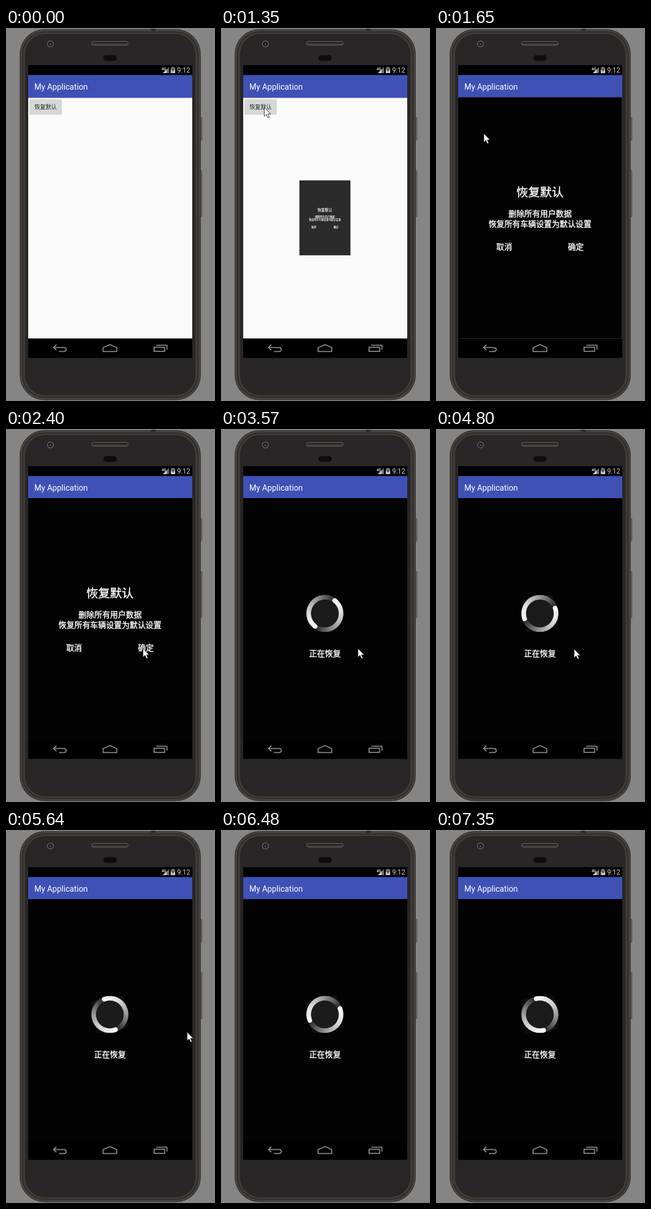
Animation, 367 px wide and 653 px high, one loop 7380 ms. Source, as an HTML page:

```html
<!DOCTYPE html>
<html lang="zh-CN">
<head>
<meta charset="utf-8">
<title>恢复默认</title>
<style>
html, body { margin: 0; width: 100%; height: 100%; overflow: hidden; background: #858585; }
svg { display: block; width: 100vw; height: 100vh; }
text { font-family: "Noto Sans CJK SC", "Noto Sans CJK", sans-serif; }
.latin { font-family: Roboto, sans-serif; }
.dialog text { fill: #fff; stroke: #fff; stroke-width: .4px; text-anchor: middle; font-size: 13.9px; }
.dialog .head { font-size: 20.8px; }
</style>
</head>
<body>
<svg viewBox="0 0 367 653" xmlns="http://www.w3.org/2000/svg">
  <defs>
    <clipPath id="page"><rect x="39" y="121" width="288" height="423"/></clipPath>
    <clipPath id="tile"><rect x="150" y="290.5" width="65" height="65"/></clipPath>
    <linearGradient id="speaker" x2="0" y2="1">
      <stop offset="0" stop-color="#1b1a1a"/><stop offset="1" stop-color="#454342"/>
    </linearGradient>
  </defs>

  <rect width="367" height="653" fill="#858585"/>

  <!-- phone -->
  <g fill="#66625f" stroke="#3a3633" stroke-width=".6">
    <rect x="340.5" y="156.5" width="3.6" height="40" rx="1"/>
    <rect x="340.5" y="249.5" width="3.6" height="81" rx="1"/>
  </g>
  <g fill="none">
    <rect x="24.5" y="2.5" width="317" height="648.5" rx="43" fill="#3b3734" stroke="#383431"/>
    <rect x="26.5" y="4.5" width="313" height="644.5" rx="41" stroke="#57514c"/>
    <rect x="29" y="7" width="308" height="639.5" rx="39" stroke="#302d2a" stroke-width="1.5"/>
    <rect x="31.5" y="9.5" width="303" height="634.5" rx="36.5" stroke="#46413d"/>
    <rect x="34.5" y="11.5" width="297" height="630.5" rx="34" fill="#282627" stroke="#222020"/>
  </g>
  <rect x="254" y="1.5" width="9" height="3" rx="1.5" fill="#24211f"/>
  <circle cx="78" cy="28" r="5.2" fill="#1b1a1a" stroke="#5c5a59" stroke-width="1.8"/>
  <circle cx="78" cy="28.5" r="2" fill="#484746"/>
  <rect x="150.5" y="23.5" width="64" height="6.5" rx="3.2" fill="url(#speaker)" stroke="#6b6967"/>
  <rect x="171" y="47.5" width="23.5" height="10" rx="5" fill="#0e0d0d"/>

  <!-- screen -->
  <rect x="39" y="65" width="288" height="512.5" fill="#000"/>
  <rect x="39" y="82.3" width="288" height="39.7" fill="#3f51b5"/>
  <rect x="39" y="122" width="288" height="421.5" fill="#fafafa"/>
  <rect x="39" y="122" width="288" height="1" fill="#c3c7dc"/>
  <rect x="39" y="123" width="288" height="1" fill="#ececf0"/>
  <text class="latin" x="49.7" y="107.6" font-size="14.2" fill="#fff">My Application</text>

  <g fill="#d0d0d0">
    <text class="latin" x="273.2" y="73.6" font-size="6.3" font-weight="700">4G</text>
    <path d="M275.5 79H286V68.5Z" fill="#777"/>
    <path d="M275.5 79H282V72.5Z"/>
    <path d="M291.5 68h3v1.2h2.5V79h-7.5v-9.8h2Z" fill="#777"/>
    <path d="M289.5 73.5h7.5V79h-7.5Z"/>
    <path d="M293.8 70l-2.6 4.4h1.7l-.5 3.3 2.7-4.5h-1.8Z" fill="#222"/>
    <text class="latin" x="300.5" y="78" font-size="11.9">9:12</text>
  </g>

  <rect x="41" y="126" width="57" height="26" rx="1.5" fill="#000" opacity=".12"/>
  <rect x="41" y="125" width="57" height="26" rx="1.5" fill="#d6d7d7"/>
  <text x="69.5" y="142.2" font-size="9.8" fill="#212121" text-anchor="middle">恢复默认</text>

  <g fill="none" stroke="#8c8c8c" stroke-width="1.8">
    <path d="M88.5 554.5L83.5 559.3L88.5 564M84 559.3H101.5Q105.8 559.3 105.8 562.8T101.5 566.3H93"/>
    <path d="M170.5 566.3V559.5L182.5 554.2L194.5 559.5V566.3Z"/>
    <path d="M260 558.9H278.5V566.2H260ZM264 555.3H282.6V563"/>
  </g>

  <!-- popup -->
  <g clip-path="url(#page)">
    <g id="popup" class="dialog">
      <rect id="shade" x="38" y="121" width="289" height="423" fill="#030303"/>
      <g id="ask">
        <text class="head" x="182.5" y="295.2">恢复默认</text>
        <text x="182.8" y="329.8">删除所有用户数据</text>
        <text x="182.6" y="348.2">恢复所有车辆设置为默认设置</text>
        <text x="119.6" y="388">取消</text>
        <text x="245.6" y="388">确定</text>
      </g>
      <g id="busy">
        <g clip-path="url(#tile)">
          <g id="ring" fill="none" stroke-width="8"></g>
        </g>
        <text x="182.5" y="397.9">正在恢复</text>
      </g>
    </g>
  </g>

  <path id="cursor" d="M0 0V15.6L3.6 12.3L6.2 18L8.7 16.9L6.2 11.4H11Z" fill="#fff" stroke="#15152a" stroke-width=".9"/>
</svg>

<script>
const LOOP = 7380, STEP = 30;
const OPEN = 1162, OPEN_TIME = 500, BUSY = 2850;
const CX = 182.4, CY = 322.9, R = 28.4;
const $ = id => document.getElementById(id);
const clamp = v => Math.max(0, Math.min(1, v));
const ease = v => (1 - Math.cos(Math.PI * v)) / 2;

// cursor stops: time, x, y
const path = [
  [120, 337, 53], [240, 215, 84], [360, 92, 126], [480, 27, 149],
  [600, 27, 149], [750, 76, 139], [1560, 76, 139], [1740, 92, 230],
  [1890, 115, 314], [2100, 182, 364], [2250, 225, 381], [2400, 240.5, 384],
  [4350, 240.5, 384], [4500, 242.5, 385], [5100, 242.5, 385],
  [5250, 245, 387], [5460, 275, 376], [5640, 318, 353.5], [5790, 342, 338]
];

function buildRing() {
  const n = 30, span = Math.PI / n;
  const at = a => `${(R * Math.cos(a)).toFixed(3)} ${(R * Math.sin(a)).toFixed(3)}`;
  // faint square tile and inner disc behind the arcs
  let html = '<rect x="-32" y="-32" width="64" height="64" fill="#0f0f0f"/>' +
    `<circle r="${R - 3}" fill="#1b1b1b"/>`;
  for (let half = 0; half < 2; half++) {
    const start = half * Math.PI;
    for (let i = 0; i < n; i++) {
      const a = start + i * span;
      const level = Math.round(246 - 222 * Math.pow(i / n, 1.6));
      html += `<path d="M${at(a)}A${R} ${R} 0 0 1 ${at(a + span * 1.15)}" stroke="rgb(${level},${level},${level})"/>`;
    }
  }
  for (const s of [1, -1]) html += `<circle cx="${s * R}" r="4" fill="#fafafa"/>`;
  $('ring').innerHTML = html;
}

function cursorAt(t) {
  const i = path.findIndex(p => p[0] > t);
  if (i < 1) return null;
  const [a, b] = [path[i - 1], path[i]];
  const k = (t - a[0]) / (b[0] - a[0]);
  return [a[1] + (b[1] - a[1]) * k, a[2] + (b[2] - a[2]) * k];
}

function show(id, on) {
  $(id).setAttribute('visibility', on ? 'inherit' : 'hidden');
}

function draw(t) {
  const k = ease(clamp((t - OPEN) / OPEN_TIME));
  show('popup', k > 0);
  $('popup').setAttribute('transform', `translate(182.5 332.3) scale(${k}) translate(-182.5 -332.3)`);
  $('shade').setAttribute('opacity', .76 + .24 * k);
  show('ask', t < BUSY);
  show('busy', t >= BUSY);
  $('ring').setAttribute('transform', `translate(${CX} ${CY}) rotate(${-53 + .32 * (t - 3570)})`);
  const p = cursorAt(t);
  show('cursor', p);
  if (p) $('cursor').setAttribute('transform', `translate(${p[0]} ${p[1]})`);
}

buildRing();
const begin = performance.now();
function frame() {
  const t = (performance.now() - begin) % LOOP;
  draw(Math.floor(t / STEP) * STEP);
  requestAnimationFrame(frame);
}
frame();
</script>
</body>
</html>
```
